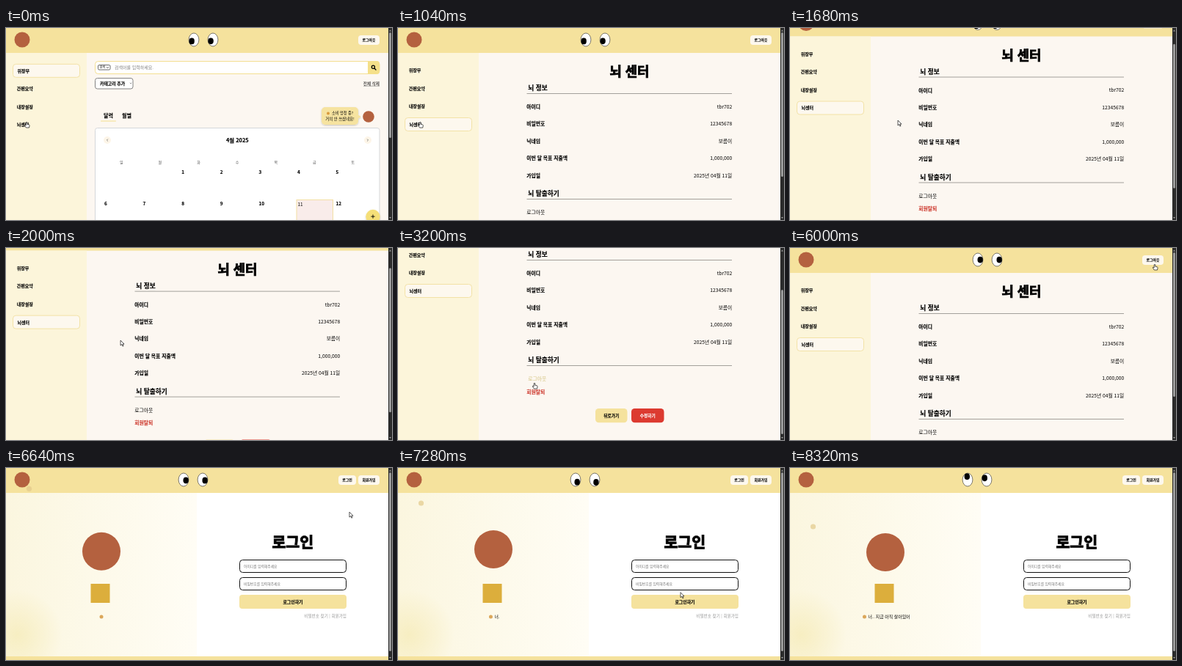
Write an HTML page that moves like this. It is 526 px wide and 262 px high and loops after 8.4 s.

```html
<!DOCTYPE html>
<html lang="ko">
<head>
<meta charset="utf-8">
<title>뇌 센터</title>
<style>
html, body { margin: 0; width: 100%; height: 100%; overflow: hidden; background: #fcf7f1; }
svg { display: block; }
text { font-family: "Noto Sans CJK KR", "Noto Sans CJK", "Noto Sans", sans-serif; white-space: pre; }
</style>
</head>
<body>
<svg id="stage" width="526" height="262" viewBox="0 0 526 262">
  <defs>
    <linearGradient id="cream"><stop offset="0" stop-color="#fbf6df"/><stop offset="1" stop-color="#fffdf5"/></linearGradient>
    <radialGradient id="glow"><stop offset="0" stop-color="#f7eec2"/><stop offset="1" stop-color="#f7eec2" stop-opacity="0"/></radialGradient>
    <filter id="soft" x="-30%" y="-30%" width="160%" height="180%">
      <feDropShadow dx="0" dy="1" stdDeviation="1.2" flood-color="#000" flood-opacity=".22"/>
    </filter>
  </defs>
</svg>
<script>
const LOOP = 8400, STEP = 80;
const HOME_END = 560, BAR_SWAP = 960, LOGIN_AT = 6480;
const MAX_SCROLL = 73;
const YELLOW = '#f5e29d', PAPER = '#fcf7f1', SIDE = '#fcf5da', INK = '#000', BROWN = '#b4613f';
const stage = document.getElementById('stage');

function el(parent, tag, attrs = {}) {
  const node = document.createElementNS('http://www.w3.org/2000/svg', tag);
  for (const k in attrs) node.setAttribute(k, attrs[k]);
  parent.appendChild(node);
  return node;
}
const group = parent => el(parent, 'g');
const box = (p, x, y, width, height, fill, more = {}) => el(p, 'rect', { x, y, width, height, fill, ...more });
const dot = (p, cx, cy, r, fill, more = {}) => el(p, 'circle', { cx, cy, r, fill, ...more });
const line = (p, d, stroke, width = 1) =>
  el(p, 'path', { d, stroke, 'stroke-width': width, fill: 'none', 'stroke-linecap': 'round' });

// y is the visual middle of the line of text; heavy weights get a thin outline
function label(p, str, x, y, size, weight = 400, fill = INK, anchor = 'start') {
  const node = el(p, 'text', {
    x, y: y + size * 0.37, 'font-size': size, 'font-weight': weight, fill, 'text-anchor': anchor
  });
  if (weight >= 700) {
    node.setAttribute('stroke', fill);
    node.setAttribute('stroke-width', size * (weight > 700 ? 0.045 : 0.02));
  }
  node.textContent = str;
  return node;
}

function header(p, buttons) {
  box(p, 0, 0, 521, 34, YELLOW);
  dot(p, 22, 16, 10.5, BROWN);
  buttons.forEach(([str, x, w]) => {
    box(p, x, 10, w, 13, '#fdf8ee', { rx: 4 });
    label(p, str, x + w / 2, 16.3, 4.9, 700, INK, 'middle');
  });
}

function sidebar(p, active) {
  box(p, 0, 34, 110, 310, SIDE);
  ['위장부', '간편요약', '내장설정', '뇌센터'].forEach((str, i) => {
    const y = 58 + i * 24.4 + (i > active ? 0.8 : 0);
    const on = i === active;
    if (on) box(p, 9.5, y - 8.7, 91, 18, '#fdf8ee', { rx: 4, stroke: '#f3e2a6' });
    label(p, str, on ? 15.5 : 14.7, y + (on ? 0.5 : 0), 6, 700);
  });
}

function buildHome(p) {
  box(p, 0, 0, 521, 262, PAPER);
  header(p, [['로그아웃', 480, 29]]);
  sidebar(p, 0);

  box(p, 121.5, 45.5, 387.5, 17, '#fff', { rx: 4, stroke: '#f3df92' });
  box(p, 125.5, 50.5, 16.5, 6.5, '#fff', { rx: 1.5, stroke: '#444', 'stroke-width': 0.8 });
  label(p, '검색', 127.5, 53.8, 4);
  line(p, 'M137.2 53.2l1.3 1.3l1.3-1.3', '#222', 0.7);
  label(p, '검색어를 입력하세요.', 148, 53.8, 6, 400, '#808080');
  el(p, 'path', { d: 'M493 45h12a4 4 0 0 1 4 4v10a4 4 0 0 1-4 4h-12z', fill: '#f5e08a' });
  dot(p, 500.4, 53.2, 2.1, 'none', { stroke: INK, 'stroke-width': 1.2 });
  line(p, 'M502 55l2 2', INK, 1.3);

  box(p, 121.5, 68.5, 51.5, 14.5, '#fff', { rx: 3, stroke: '#777', 'stroke-width': 0.9 });
  label(p, '카테고리 추가', 128, 75.7, 5.9, 700);
  line(p, 'M169 75l1 1l1-1', '#555', 0.6);
  label(p, '전체 삭제', 509, 75.7, 5.6, 500, INK, 'end');
  line(p, 'M487.5 79.2h21', '#555', 0.5);

  label(p, '달력', 133, 119.5, 7, 700);
  label(p, '월별', 158, 119.5, 7, 700);
  line(p, 'M129.5 127h20', '#f3df8c');

  const tip = el(p, 'g', { filter: 'url(#soft)' });
  box(tip, 430, 108, 50, 24, '#f6e3a0', { rx: 5 });
  el(tip, 'path', { d: 'M479.5 118l4 3l-4 3z', fill: '#f6e3a0' });
  dot(p, 439, 116.5, 2, '#d99a3c');
  label(p, '소비 멍청 중?', 444, 116.3, 5.2, 500);
  label(p, '거의 안 쓰셨네요!', 455, 124, 5.4, 500, INK, 'middle');
  dot(p, 494, 121, 7.8, BROWN);

  box(p, 121.5, 136.5, 387.5, 140, '#fff', { rx: 3, stroke: '#d5d7da' });
  label(p, '4월 2025', 315.3, 153, 7.4, 700, INK, 'middle');
  [[138, 1], [493, -1]].forEach(([x, s]) => {
    dot(p, x, 153, 5, '#fdf5e8');
    line(p, `M${x + s * 0.6} 151.8l${-s * 1.2} 1.2l${s * 1.2} 1.2`, '#555', 0.7);
  });
  [...'일월화수목금토'].forEach((str, i) => label(p, str, 157.3 + i * 52.6, 183, 5, 400, '#555', 'middle'));
  box(p, 396, 234.5, 49.5, 40, '#f9ecea', { stroke: '#f3dfa4' });
  for (let day = 1; day <= 12; day++) {
    const slot = day + 1;
    const today = day === 11;
    label(p, day, 134 + (slot % 7) * 52.6 + (today ? 0.5 : 0),
      196.5 + Math.floor(slot / 7) * 43.5 + (today ? 1 : 0), 6.4, today ? 500 : 700);
  }
  dot(p, 500, 257.5, 9.7, '#f5df78', { filter: 'url(#soft)' });
  line(p, 'M497.8 257.2h4.4M500 255v4.4', INK, 0.9);
}

function buildBrain(p) {
  box(p, 0, 0, 521, 340, PAPER);
  header(p, [['로그아웃', 480, 29]]);
  sidebar(p, 3);
  label(p, '뇌 센터', 315.3, 59.8, 17.7, 900, INK, 'middle');
  [['뇌 정보', 82], ['뇌 탈출하기', 226]].forEach(([str, y]) => {
    label(p, str, 177.3, y, 8.7, 700);
    box(p, 175.5, y + 7, 279.5, 1, '#a3a09b');
  });
  [['아이디', 'tbr702'], ['비밀번호', '12345678'], ['닉네임', '보름이'],
   ['이번 달 목표 지출액', '1,000,000'], ['가입일', '2025년 04월 11일']].forEach(([name, value], i) => {
    const y = 107.5 + i * 23.4;
    label(p, name, 175.3, y, 6.8, 700);
    label(p, value, 455.3, y, 6.75, 500, INK, 'end');
  });
  const logout = label(p, '로그아웃', 175.3, 251.5, 6.8, 500);
  label(p, '회원탈퇴', 175.3, 269.2, 6.8, 700, '#cf4036');
  [['뒤로가기', 269, 43.5, YELLOW, INK], ['수정하기', 318, 44.5, '#dc3a30', '#fff']].forEach(([str, x, w, fill, ink]) => {
    box(p, x, 292, w, 19.3, fill, { rx: 4.5 });
    label(p, str, x + w / 2, 301.6, 5.7, 700, ink, 'middle');
  });
  return logout;
}

function buildLogin(p) {
  box(p, 0, 0, 521, 262, '#fff');
  box(p, 0, 34, 260, 223, 'url(#cream)');
  dot(p, 15, 228, 62, 'url(#glow)');
  header(p, [['로그인', 453, 24], ['회원가입', 480, 29]]);
  box(p, 0, 257, 521, 5, YELLOW);
  box(p, 115.5, 158, 26, 26, '#dcae3c');

  label(p, '로그인', 390.8, 101.3, 20.6, 900, INK, 'middle');
  [['아이디를 입력해주세요', 125], ['비밀번호를 입력해주세요', 149]].forEach(([str, y]) => {
    box(p, 318.5, y + 0.5, 145, 17, '#fff', { rx: 4, stroke: '#111' });
    label(p, str, 324, y + 9, 4.8, 400, '#757575');
  });
  box(p, 318, 173, 146, 19, YELLOW, { rx: 4 });
  label(p, '로그인하기', 391, 182.7, 5.9, 700, INK, 'middle');
  label(p, '비밀번호 찾기 | 회원가입', 464, 201.5, 5.6, 400, '#999', 'end');

  return {
    mascot: dot(p, 130, 111, 26, BROWN),
    coin: dot(p, 31.5, 48, 3.6, '#e3c98a', { opacity: 0.7 }),
    mark: dot(p, 0, 203, 2.5, '#dba75a'),
    line: label(p, '', 135, 203, 5.9, 500, INK, 'middle')
  };
}

const page = group(stage);
const home = group(page), brain = group(page), login = group(page);
buildHome(home);
const logout = buildBrain(brain);
const intro = buildLogin(login);

const eyes = [256, 282].map(x => {
  const g = group(page);
  el(g, 'ellipse', { cx: x, cy: 16, rx: 6.9, ry: 9, fill: '#fff', stroke: '#444', 'stroke-width': 0.7 });
  return { g, x, pupil: el(g, 'ellipse', { rx: 3.7, ry: 4.4, fill: '#000' }) };
});

box(stage, 521, 0, 5, 262, '#2b2b2b');
el(stage, 'path', { d: 'M522 4.5l1.5-2l1.5 2zM522 258l1.5 2l1.5-2z', fill: '#a0a0a0' });
const thumb = box(stage, 522, 6, 3, 144, '#9c9c9c', { rx: 1.5 });

const arrow = el(stage, 'path', {
  d: 'M0 0V7l1.7-1.5l1.2 2.6l1.1-.5l-1.2-2.5H5z', fill: '#fff', stroke: '#111', 'stroke-width': 0.7
});
const hand = el(stage, 'path', {
  d: 'M-.8 .8q.8-1.2 1.6 0V3.2l2.6.7q.8.3.7 1.2L3.5 8H-.6L-2.6 5q-.2-1 .7-.8l1.1.8z',
  fill: '#fff', stroke: '#111', 'stroke-width': 0.7
});

// [time, x, y]
const pointer = [
  [0, 28, 128], [1000, 28, 128], [1440, 122, 131], [1680, 147, 126], [2640, 182, 126],
  [3000, 186, 184], [3280, 186, 184], [3520, 340, 221], [3840, 400, 130], [4240, 435, 79],
  [4480, 435, 79], [5280, 490, 20], [5600, 497, 22], [6400, 497, 22], [7120, 385, 169],
  [7360, 385, 170], [7840, 238, -2]
];
// [time, offset]
const scrolling = [
  [0, 0], [1360, 0], [1680, 22.5], [1840, 22.5], [2480, MAX_SCROLL], [3600, MAX_SCROLL], [4160, 0]
];

function at(keys, t) {
  const i = keys.findIndex(k => k[0] > t);
  if (i < 0) return keys[keys.length - 1].slice(1);
  const a = keys[i - 1], b = keys[i];
  const u = (t - a[0]) / (b[0] - a[0]);
  const e = u * u * (3 - 2 * u);
  return a.slice(1).map((v, n) => v + (b[n + 1] - v) * e);
}

const within = (t, a, b) => t >= a && t < b;
const show = (node, on) => node.setAttribute('display', on ? 'inline' : 'none');
const move = (node, x, y) => node.setAttribute('transform', `translate(${x} ${y})`);
const message = [...'너.. 지금 아직 살아있어'];

function drawIntro(t) {
  const phase = (t - 7280) / 2080 * Math.PI * 2;
  intro.mascot.setAttribute('cy', 113 - 2 * Math.cos(phase));
  intro.coin.setAttribute('cy', 48 + (t - 7280) / 1040 * 32);
  const typed = Math.max(0, Math.floor((t - 7120) / 80));
  intro.line.textContent = message.slice(0, typed).join('');
  intro.mark.setAttribute('cx', 135 - intro.line.getComputedTextLength() / 2 - 5);
}

function draw(t) {
  const [x, y] = at(pointer, t);
  const [scroll] = at(scrolling, t);
  const out = t >= LOGIN_AT;
  show(home, t < HOME_END);
  show(brain, within(t, HOME_END, LOGIN_AT));
  show(login, out);
  move(page, 0, -scroll);

  const shift = out ? -14 : 0;
  eyes.forEach(({ g, x: ex, pupil }) => {
    move(g, shift, 0);
    const dx = x - ex - shift, dy = y + scroll - 16;
    const d = Math.hypot(dx, dy) || 1;
    pupil.setAttribute('cx', ex + dx / d * 3.2);
    pupil.setAttribute('cy', 16 + dy / d * 4.4);
  });

  const hover = within(t, 2960, 3360);
  logout.setAttribute('x', hover ? 177.3 : 175.3);
  logout.setAttribute('fill', hover ? '#d3c27c' : INK);

  thumb.setAttribute('y', 6 + scroll / MAX_SCROLL * 51);
  thumb.setAttribute('height', t < BAR_SWAP ? 144 : out ? 244 : 197);

  const pointing = t < 1100 || hover || within(t, 3480, 3560) || within(t, 5200, LOGIN_AT);
  show(hand, pointing);
  show(arrow, !pointing && y > 0);
  move(hand, x, y);
  move(arrow, x, y);
  if (out) drawIntro(t);
}

const start = performance.now();
function tick() {
  const t = (performance.now() - start) % LOOP;
  draw(Math.floor(t / STEP) * STEP);
  requestAnimationFrame(tick);
}
tick();
</script>
</body>
</html>
```
